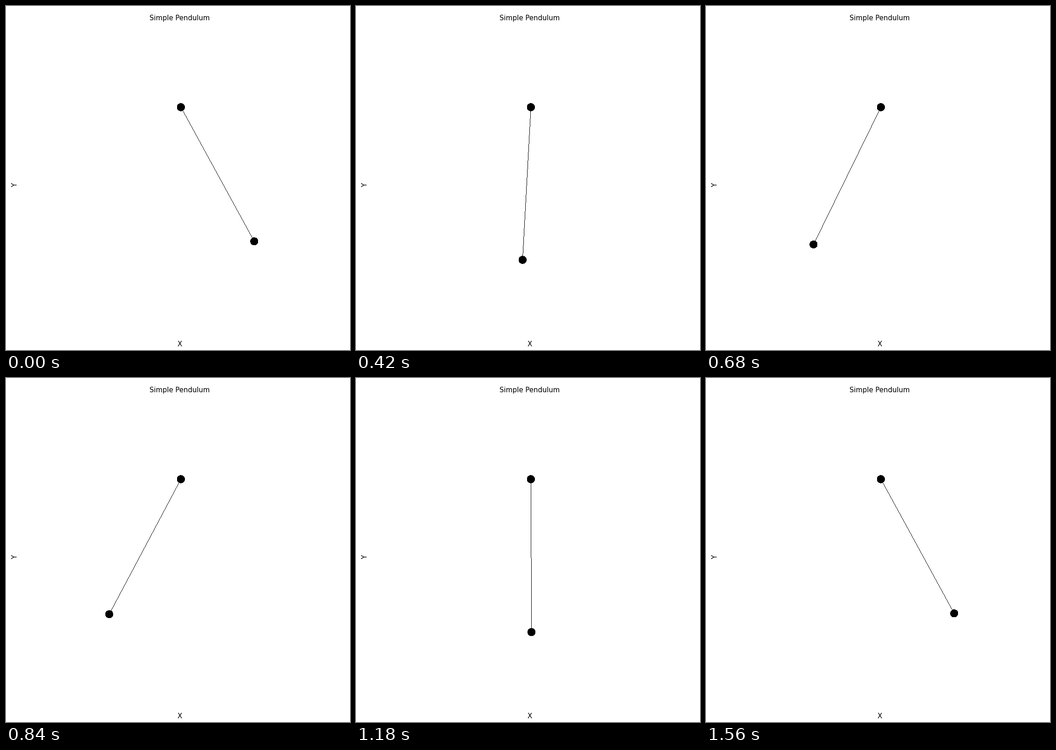
A matplotlib script that plays this animation: 748 px wide and 748 px high, repeating every 1600 ms.

```python
import math

import matplotlib.pyplot as plt
import numpy as np
from matplotlib.animation import FuncAnimation
from matplotlib.patches import Circle, Polygon

SIZE = 748
DPI = 64
FRAMES = 80
STEP_MS = 20

PIVOT = (380.35, 220.0)
ROD = 332.5         # pixels
SWING = 0.5         # radians
OMEGA = 4.0         # radians per second
BOB_RADIUS = 8.1

plt.rcParams["font.family"] = "DejaVu Sans"
fig = plt.figure(figsize=(SIZE / DPI, SIZE / DPI), dpi=DPI, facecolor="white")
ax = fig.add_axes([0, 0, 1, 1])
ax.set_xlim(0, SIZE)
ax.set_ylim(SIZE, 0)
ax.axis("off")


def label(x, y, text, angle=0):
    ax.text(x, y, text, fontsize=15 * 72 / DPI, color="black", rotation=angle,
            rotation_mode="anchor", ha="center", va="baseline")


def shape(patch, smooth=False):
    patch.set(facecolor="black", linewidth=0, antialiased=smooth, snap=False)
    return ax.add_patch(patch)


def rod_outline(x, y):
    """A crisp staircase, one whole pixel wide in every row."""
    px, py = PIVOT
    rows = np.arange(math.floor(py), math.floor(y))
    left = np.floor(px + (rows + 0.5 - py) * (x - px) / (y - py))
    xs = np.repeat(left, 2)
    ys = np.column_stack([rows, rows + 1]).ravel()
    return np.column_stack([np.append(xs, xs[::-1] + 1),
                            np.append(ys, ys[::-1])])


def bob_at(t):
    angle = SWING * math.cos(OMEGA * t)
    return (PIVOT[0] + ROD * math.sin(angle),
            PIVOT[1] + ROD * math.cos(angle))


label(378, 31, "Simple Pendulum")
label(378, 739.5, "X")
label(24, 388, "Y", 90)

start = bob_at(0)
rod = shape(Polygon(rod_outline(*start), closed=True), smooth=True)
shape(Circle(PIVOT, BOB_RADIUS))
bob = shape(Circle(start, BOB_RADIUS))


def update(n):
    # the pose rests for one extra step at the end of the swing
    x, y = bob_at(min(n, FRAMES - 2) * STEP_MS / 1000)
    rod.set_xy(rod_outline(x, y))
    bob.set_center((x, y))
    return rod, bob


anim = FuncAnimation(fig, update, frames=FRAMES, interval=STEP_MS,
                     repeat=True, repeat_delay=0, blit=False)
plt.show()
```
